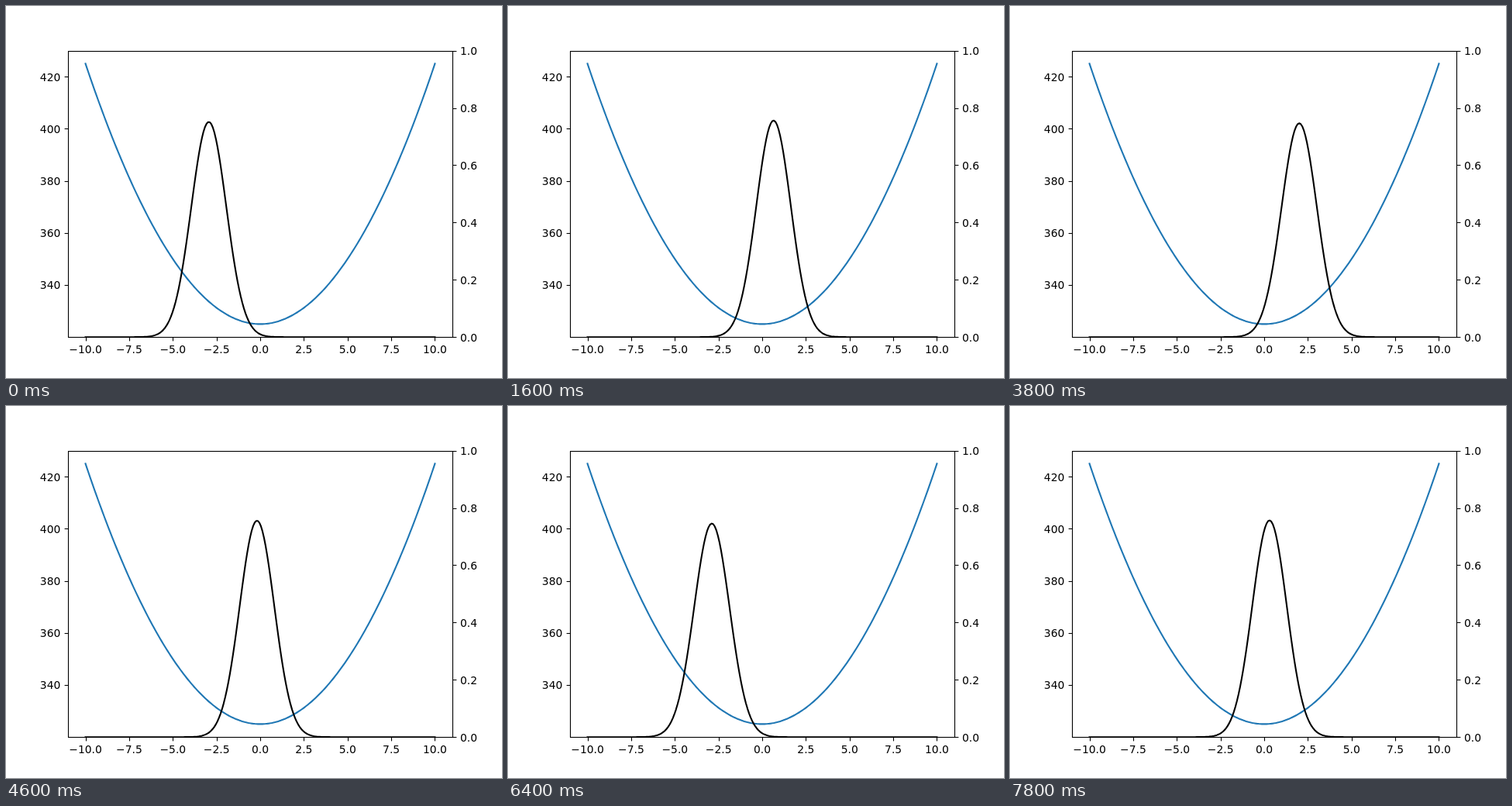
Animation of 640x480 px, one loop 8 s. Source, as an HTML page with a canvas:

```html
<!DOCTYPE html>
<html lang="en">
<head>
<meta charset="utf-8">
<title>Wave packet in a harmonic well</title>
<style>
  html, body { margin: 0; width: 100%; height: 100%; overflow: hidden; background: #fff; }
  canvas { display: block; }
</style>
</head>
<body>
<canvas id="stage" width="640" height="480"></canvas>
<script>
const ctx = document.getElementById('stage').getContext('2d');

// Plot area and data-to-pixel scales
const LEFT = 80, RIGHT = 576, TOP = 57.6, BOTTOM = 427.2;
const xPix = x => 328 + x * (RIGHT - LEFT) / 22;
const energyPix = v => BOTTOM - (v - 320) * (BOTTOM - TOP) / 110;
const ampPix = a => BOTTOM - a * (BOTTOM - TOP);
const snap = p => Math.round(p) + 0.5;

const FRAME_MS = 200, FRAMES = 40;
const CELLS = 225, DX = 20 / CELLS;
const grid = Array.from({ length: CELLS + 1 }, (_, i) => -10 + i * DX);

// Schrödinger equation on the grid: a displaced ground state swings in x²/2
function simulate() {
  const STEPS = 100, dt = 0.2 / STEPS;
  const re = grid.map(x => Math.PI ** -0.25 * Math.exp(-((x + 3) ** 2) / 2));
  const im = grid.map(() => 0);
  const addH = (to, from, k) => {
    for (let i = 1; i < CELLS; i++) {
      const curvature = (from[i - 1] - 2 * from[i] + from[i + 1]) / (DX * DX);
      to[i] += k * (grid[i] ** 2 * from[i] - curvature) / 2;
    }
  };
  return Array.from({ length: FRAMES }, () => {
    for (let s = 0; s < STEPS; s++) {
      addH(im, re, -dt / 2);
      addH(re, im, dt);
      addH(im, re, -dt / 2);
    }
    return re.map((r, i) => Math.hypot(r, im[i]));
  });
}

function segment(x1, y1, x2, y2) {
  ctx.beginPath();
  ctx.moveTo(x1, y1);
  ctx.lineTo(x2, y2);
  ctx.stroke();
}

function curve(color, yAt) {
  ctx.save();
  ctx.beginPath();
  ctx.rect(80, 58, 496, 370);
  ctx.clip();
  ctx.strokeStyle = color;
  ctx.lineWidth = 2.083;
  ctx.lineJoin = 'round';
  ctx.lineCap = 'square';
  ctx.beginPath();
  grid.forEach((x, i) => ctx.lineTo(xPix(x), yAt(x, i)));
  ctx.stroke();
  ctx.restore();
}

function label(text, x, y, align) {
  ctx.textAlign = align;
  ctx.fillText(text, x, Math.round(y));
}

function axes() {
  ctx.strokeStyle = ctx.fillStyle = '#000';
  ctx.lineWidth = 1.11;
  ctx.font = '13.889px "DejaVu Sans", sans-serif';
  ctx.strokeRect(snap(LEFT), snap(TOP), RIGHT - LEFT, snap(BOTTOM) - snap(TOP));
  for (let x = -10; x <= 10; x += 2.5) {
    const px = snap(xPix(x));
    segment(px, 427.5, px, 432.4);
    label(x.toFixed(1).replace('-', '\u2212'), xPix(x), 448, 'center');
  }
  for (let v = 340; v <= 420; v += 20) {
    const py = snap(energyPix(v));
    segment(80.5, py, 75.6, py);
    label(v, 70.3, energyPix(v) + 5.4, 'right');
  }
  for (let n = 0; n <= 5; n++) {
    const py = snap(ampPix(n / 5));
    segment(576.5, py, 581.4, py);
    label((n / 5).toFixed(1), 586, ampPix(n / 5) + 5.4, 'left');
  }
}

const packets = simulate();
let shown = -1;

function draw(now) {
  const frame = Math.floor(now / FRAME_MS) % FRAMES;
  if (frame !== shown) {
    shown = frame;
    ctx.fillStyle = '#fff';
    ctx.fillRect(0, 0, 640, 480);
    curve('#1f77b4', x => energyPix(325 + x * x));
    curve('#000', (x, i) => ampPix(packets[frame][i]));
    axes();
  }
  requestAnimationFrame(draw);
}
draw(performance.now());
</script>
</body>
</html>
```
